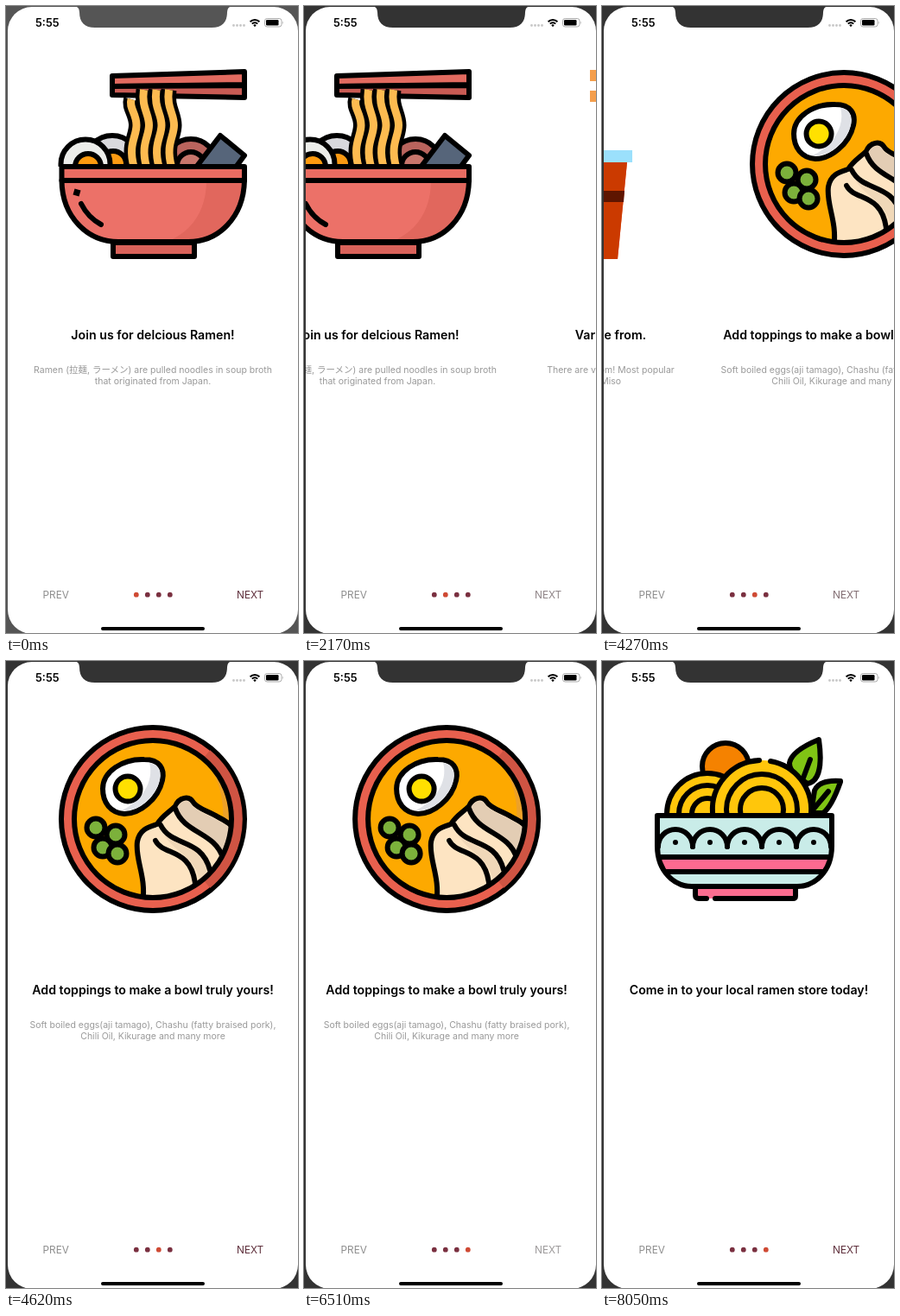
An HTML page that plays this animation: 338x726 px, repeating every 8.12 s.

```html
<!DOCTYPE html>
<html lang="en">
<head>
<meta charset="utf-8">
<title>Ramen onboarding</title>
<style>
html, body { margin: 0; width: 100%; height: 100%; overflow: hidden; background: #333 }
svg { display: block; width: 338px; height: 726px; font-family: Inter, "Noto Sans CJK JP", "Noto Sans CJK", sans-serif }
.ink { stroke: #000; stroke-width: 6; stroke-linejoin: round; stroke-linecap: round }
.line { fill: none }
.title { font-size: 14.2px; font-weight: 600; text-anchor: middle }
.body { font-size: 10.5px; fill: #999; text-anchor: middle }
.button { font-size: 11.8px }
</style>
</head>
<body>
<svg viewBox="0 0 338 726">
  <defs>
    <clipPath id="screen"><rect x="2" y="1" width="336" height="726" rx="28"/></clipPath>
    <clipPath id="broth"><circle cx="170" cy="183" r="91"/></clipPath>
    <clipPath id="dish"><path id="dishShape" d="M64 179H266V214C266 244 246 261 226 261H104C84 261 64 244 64 214Z"/></clipPath>
    <clipPath id="bowl"><path id="bowlShape" d="M64.500 202C65 245 95 273 130 273H211C246 273 275 245 276 202Z"/></clipPath>
    <clipPath id="aboveRim"><rect x="50" y="60" width="240" height="126"/></clipPath>
  </defs>
  <rect id="backdrop" width="338" height="726"/>
  <g clip-path="url(#screen)">
    <rect width="338" height="727" fill="#fff"/>
    <g id="pages">
      <!-- ramen bowl -->
      <g>
        <g class="ink" clip-path="url(#aboveRim)">
          <circle cx="123" cy="181" r="31" fill="#d9d9dd"/>
          <circle cx="124" cy="183" r="15" fill="#fb9a12"/>
          <circle cx="92" cy="183" r="28.500" fill="#ecedea"/>
          <circle cx="95" cy="186" r="15" fill="#ff9b0f"/>
          <circle cx="214" cy="184" r="30" fill="#b9645d"/>
          <circle cx="214" cy="185" r="16" fill="#c8766c"/>
          <path d="M219 188L248 150L276 173L265 188Z" fill="#56657a"/>
        </g>
        <path class="ink" d="M123 81L276 76V91L123 93Z" fill="#e26b60"/>
        <path class="ink" d="M123 93L276 92V106L123 103Z" fill="#c95b54"/>
        <g id="noodles" class="line"></g>
        <use href="#bowlShape" fill="#ec7168"/>
        <path clip-path="url(#bowl)" d="M232 202C232 240 212 264 183 274H280V202Z" fill="#e1675d"/>
        <use href="#bowlShape" class="ink line"/>
        <path class="ink" d="M64.500 186H276V202H64.500Z" fill="#e96c62"/>
        <path class="ink" d="M124 274H218V290H124Z" fill="#d9625a"/>
        <path d="M79.500 211.500L86.500 213.500L84.500 220.500L77.500 218.500Z"/>
        <path class="ink line" stroke-linecap="butt" d="M87 229Q95 245 110 253"/>
      </g>
      <!-- instant cup -->
      <g>
        <path d="M80 74H214V87H80ZM80 98H152V111H80Z" fill="#f49e4c"/>
        <path d="M180 74H214V87H180Z" fill="#dc904f"/>
        <path d="M153 87C143 108 155 118 155 132S147 150 150 167H213C217 142 211 133 208 118S211 97 213 87Z" fill="#ffcc85"/>
        <path d="M153 87C143 108 155 118 155 132S147 150 150 167H180V87Z" fill="#fce4bd"/>
        <path d="M180 87C165 108 178 117 178 131S169 150 172 167H186C184 149 191 144 191 130S181 108 189 87Z" fill="#eeb05c"/>
        <path d="M107 181H255L244 293H117Z" fill="#fb5a28"/>
        <path d="M181 181H255L244 293H181Z" fill="#cb3a00"/>
        <path d="M110 214H181V227H111Z" fill="#832200"/>
        <path d="M181 214H252L251 227H181Z" fill="#5e1500"/>
        <path d="M99 167H261V181H99Z" fill="#b0ebff"/>
        <path d="M181 167H261V181H181Z" fill="#9be0fc"/>
        <path d="M149 200H181V241H149Z" fill="#f49e4c"/>
        <path d="M181 200H213V241H181Z" fill="#de924f"/>
      </g>
      <!-- toppings -->
      <g>
        <circle class="ink" cx="170" cy="183" r="106" fill="#e8604e"/>
        <path d="M233 107A98.500 98.500 0 0 1 233 259" fill="none" stroke="#cf5443" stroke-width="10"/>
        <circle cx="170" cy="183" r="91" fill="#fda900"/>
        <g clip-path="url(#broth)">
          <path d="M222 105C250 135 254 165 250 200H270V105Z" fill="#eda128"/>
          <path class="ink" d="M158 280C163 250 149 230 152 209C155 194 166 192 175 189C180 180 189 175 196 168C200 158 212 155 217 164C223 172 234 173 246 181C256 186 262 190 268 200V280Z" fill="#fde4c2"/>
          <path d="M197 172C201 161 212 159 216 168C224 176 250 184 262 196L252 226C244 205 208 204 197 172Z" fill="#e3cdb4"/>
          <path d="M179 193C190 216 222 204 235 240L224 254C217 222 190 222 179 193Z" fill="#f0d8b8"/>
          <path class="ink line" d="M173 208C182 226 214 216 219 258M179 190C192 216 226 204 236 242M196 171C206 200 242 198 251 228"/>
        </g>
        <circle class="ink line" cx="170" cy="183" r="91"/>
        <g class="ink">
          <path d="M112 148C112 128 135 113 160 114C178 114 184 125 181 138C176 160 155 177 137 177C121 176 112 164 112 148Z" fill="#fff"/>
          <path d="M166 118C172 140 156 163 134 173C155 175 174 156 178 138C180 126 175 119 166 118Z" fill="#dfe1e6" stroke="none"/>
          <circle cx="141" cy="148" r="14.500" fill="#ffe000"/>
          <g fill="#7cb13b">
            <circle cx="104" cy="193" r="10.500"/><circle cx="127" cy="201" r="10.500"/>
            <circle cx="112" cy="216" r="10.500"/><circle cx="129" cy="223" r="10.500"/>
          </g>
        </g>
      </g>
      <!-- noodle dish -->
      <g>
        <g class="ink">
          <circle cx="143" cy="122" r="27" fill="#f58200"/>
          <path d="M251 91C234 98 219 107 217 118C217 130 230 136 238 142C249 140 256 126 251 91Z" fill="#80c414"/>
          <path d="M276 139C262 138 250 141 246 150L242 176H256C264 170 270 157 276 140Z" fill="#80c414"/>
          <path class="line" d="M241 114L232 138M262 151L246 170"/>
          <g fill="#ffc60b">
            <circle cx="122" cy="177" r="47"/><circle cx="122" cy="177" r="33"/><circle cx="122" cy="177" r="18"/>
            <circle cx="185" cy="172" r="57" stroke="none"/><circle cx="185" cy="172" r="41"/><circle cx="185" cy="172" r="25"/>
          </g>
          <path class="line" d="M128 176A57 57 0 0 1 182 115L168 117M195 116A57 57 0 0 1 242 176"/>
        </g>
        <path d="M108 262H224V275H108Z" fill="#fc6d90"/>
        <path class="ink line" d="M131 275H221Q224 275 224 272V262M121 275H112Q108 275 108 271V262"/>
        <use href="#dishShape" fill="#c9ece8"/>
        <g clip-path="url(#dish)">
          <path d="M60 228H270V244H60Z" fill="#fd6a90"/>
          <path class="ink line" d="M60 227H270M60 244H270"/>
          <g id="scallops"></g>
        </g>
        <use href="#dishShape" class="ink line"/>
      </g>
    </g>
    <g id="dots"></g>
    <text class="button" x="42.500" y="686" fill="#8e8e8e">PREV</text>
    <text class="button" id="next" x="267" y="686">NEXT</text>
    <text x="34" y="24" font-size="12.800" font-weight="600">5:55</text>
    <g fill="#c8c8c8"><circle cx="263.500" cy="22.500" r="1.400"/><circle cx="267.500" cy="22.500" r="1.400"/><circle cx="271.500" cy="22.500" r="1.400"/><circle cx="275.500" cy="22.500" r="1.400"/></g>
    <path d="M282.600 18.200a7.600 7.600 0 0 1 10.800 0M284.800 20.600a4.500 4.500 0 0 1 6.400 0" fill="none" stroke="#000" stroke-width="2"/>
    <path d="M286.300 22.300L288 24.200l1.700-1.900a2.300 2.300 0 0 0-3.400 0z"/>
    <rect x="299.500" y="14.500" width="19.500" height="9.500" rx="2.700" fill="none" stroke="#aaa"/>
    <rect x="301" y="16" width="14.500" height="6.500" rx="1.300"/>
    <path d="M320 17.500q1.500 1.700 0 3.500z" fill="#aaa"/>
    <rect x="110" y="719" width="120" height="4" rx="2"/>
  </g>
  <path id="notch" d="M79 0Q85 1 85 7C85 19 91 25 103 25H238C250 25 256 19 256 7Q256 1 262 0Z"/>
</svg>
<script>
const LOOP = 8120, PITCH = 336, SLIDE = 350, FADE = 470, FOCUS = 1120;
const taps = [2056, 4055, 6486];
const copy = [
  ["Join us for delcious Ramen!", "Ramen (拉麺, ラーメン) are pulled noodles in soup broth", "that originated from Japan."],
  ["Various flavors to choose from.", "There are various flavours to choose from! Most popular", "ones are Shoyu, Shio, and Miso"],
  ["Add toppings to make a bowl truly yours!", "Soft boiled eggs(aji tamago), Chashu (fatty braised pork),", "Chili Oil, Kikurage and many more"],
  ["Come in to your local ramen store today!"]
];
const $ = id => document.getElementById(id);
const clamp = v => Math.min(1, Math.max(0, v));
const smooth = u => u * u * (3 - 2 * u);

const strands = [[145, 108], [159.5, 97], [174, 97], [188.5, 97]].map(([x, top]) =>
  `M${x} ${top}C${x - 3} 118 ${x + 6} 124 ${x + 6} 138S${x - 4} 160 ${x + 3} 186`).join("");
$("noodles").innerHTML =
  `<path d="${strands}" stroke="#000" stroke-width="18"/><path d="${strands}" stroke="#fdbb50" stroke-width="9"/>`;

$("scallops").innerHTML = [85, 125, 165, 205, 245].map(x =>
  `<path class="ink line" d="M${x - 20} 215a20 20 0 0 1 40 0"/><circle cx="${x}" cy="210" r="3"/>`).join("");

$("dots").innerHTML = copy.map((_, i) => `<circle cx="${150.8 + 13 * i}" cy="681.7" r="2.900"/>`).join("");

[...$("pages").children].forEach((page, i) => {
  page.setAttribute("transform", `translate(${PITCH * i})`);
  const [title, ...lines] = copy[i];
  page.insertAdjacentHTML("beforeend", `<text class="title" x="170" y="386">${title}</text>` +
    lines.map((s, k) => `<text class="body" x="170" y="${425 + 13 * k}">${s}</text>`).join(""));
});

function draw(t) {
  const scroll = taps.reduce((sum, tap) => sum + smooth(clamp((t - tap) / SLIDE)), 0);
  const current = taps.filter(tap => t >= tap).length;
  const since = current ? t - taps[current - 1] : FADE;
  const shade = t < FOCUS ? "#555" : "#333";
  $("pages").setAttribute("transform", `translate(${-PITCH * scroll})`);
  $("backdrop").setAttribute("fill", shade);
  $("notch").setAttribute("fill", shade);
  $("next").style.fill = `color-mix(in srgb, #5f303c ${100 * clamp(since / FADE)}%, #a0a0a0)`;
  [...$("dots").children].forEach((dot, i) => dot.setAttribute("fill", i === current ? "#cf4a34" : "#7a3040"));
}

const start = performance.now();
function tick() {
  draw((performance.now() - start) % LOOP);
  requestAnimationFrame(tick);
}
tick();
</script>
</body>
</html>
```
